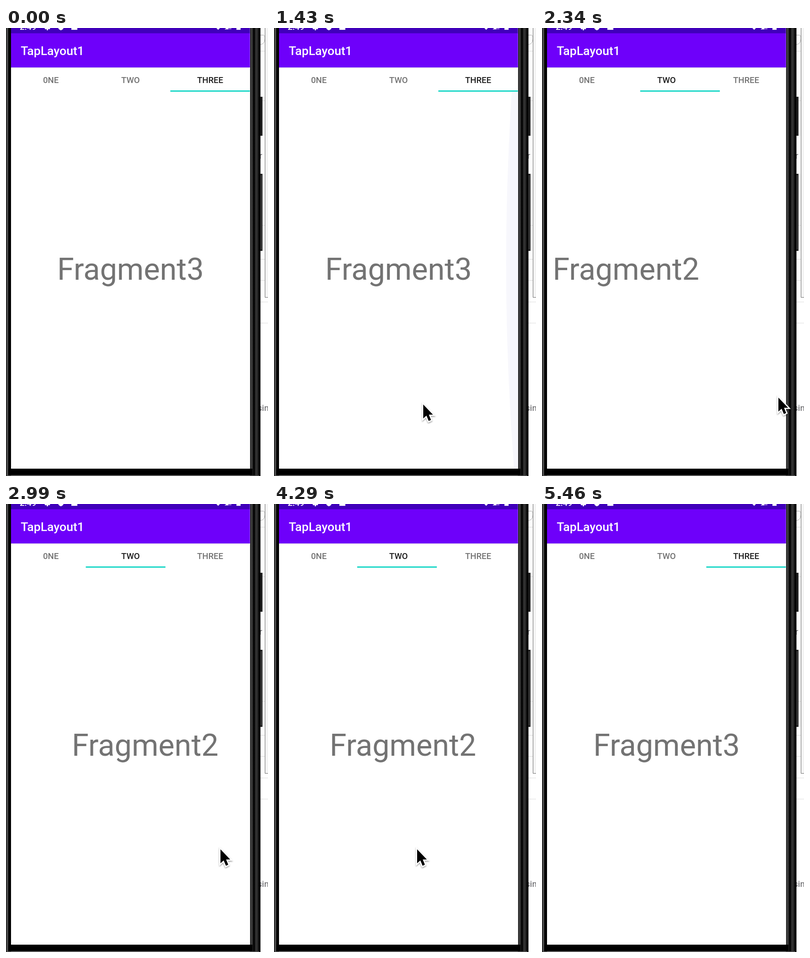
An HTML page for the animation above (5590 ms loop, 573 px wide and 977 px high).

```html
<!DOCTYPE html>
<html lang="en">
<head>
<meta charset="utf-8">
<title>Tab layout</title>
<style>
  html, body { margin: 0; width: 100%; height: 100%; overflow: hidden; background: #fff; }
  svg { display: block; width: 573px; height: 977px; font-family: Roboto, sans-serif; }
  .tab { font-size: 18.6px; font-weight: 500; text-anchor: middle; fill: #737373; }
  .tab.on { fill: #1d1d1d; }
  .page { font-size: 66.6px; text-anchor: middle; fill: #737373; }
  .side { font-size: 19px; fill: #5a5a5e; }
</style>
</head>
<body>
<svg viewBox="0 0 573 977">
  <defs>
    <linearGradient id="left">
      <stop offset="0" stop-color="#161616"/><stop offset=".3" stop-color="#606060"/>
      <stop offset=".5" stop-color="#080808"/><stop offset="1" stop-color="#000"/>
    </linearGradient>
    <linearGradient id="right">
      <stop offset="0" stop-color="#0a0a0a"/><stop offset=".17" stop-color="#4a4a4a"/>
      <stop offset=".32" stop-color="#050505"/><stop offset=".45" stop-color="#080808"/>
      <stop offset=".55" stop-color="#363636"/><stop offset=".72" stop-color="#2a2a2a"/>
      <stop offset=".85" stop-color="#050505"/><stop offset="1" stop-color="#000"/>
    </linearGradient>
    <linearGradient id="shade" x2="0" y2="1">
      <stop offset="0" stop-color="#e6e6ea"/><stop offset="1" stop-color="#fff"/>
    </linearGradient>
    <clipPath id="screen"><rect x="11" width="522.6" height="961"/></clipPath>
    <filter id="drop" x="-40%" y="-30%" width="190%" height="170%">
      <feDropShadow dx="0" dy="2" stdDeviation="1.8" flood-opacity=".4"/>
    </filter>
  </defs>

  <rect width="573" height="977" fill="#fff"/>
  <path d="M556 50.5h10M556 158.5h10M556 430.5h10M556 504.5h10M556 550.5h10M556 597.5h17M556 643.5h17" stroke="#dcdcdc"/>
  <path d="M554 15.5h8q4 0 4 5v3q0 12-11 13" fill="none" stroke="#aaa"/>
  <rect x="567" width="6" height="587" fill="#f3f3f3"/>
  <path d="M566.5 0V587.5H573" fill="none" stroke="#6c6c6c"/>
  <text class="side" x="554" y="285">r</text>
  <text class="side" x="550" y="835">sin</text>

  <path d="M553 150h8v85h-8zM553 318h8v168h-8z" fill="#222"/>
  <path d="M558 321V483" stroke="#777"/>
  <rect width="11" height="977" fill="url(#left)"/>
  <rect x="533.6" width="22.9" height="977" fill="url(#right)"/>
  <rect x="5" y="961" width="534" height="14.5" fill="#000"/>
  <rect x="3" y="975.5" width="551" height="1.5" fill="#555"/>

  <g clip-path="url(#screen)">
    <rect x="11" width="523" height="961" fill="#fff"/>
    <g id="pages"></g>
    <path id="glow" fill="#f7f7fc"/>
    <rect x="11" y="86" width="523" height="3" fill="url(#shade)"/>
    <rect x="11" y="11" width="523" height="75" fill="#6e00fa"/>
    <rect x="11" width="523" height="11.5" fill="#4000ba"/>
    <g fill="#fff">
      <text x="30" y="3.5" font-size="18.6" font-weight="500">2:49</text>
      <path d="M84 0h13l-2 3-3-1v3h-3V2l-3 1zM114 0h12q-2 4-6 5-4-1-6-5zM143 0h13v4h-13zM460 0h8l-4 4zM478 3l4-3h4v3zM504 0h9v4h-9z"/>
      <path d="M486 0h7v3h-7z" opacity=".4"/>
      <text x="32.3" y="59" font-size="26.6" font-weight="500">TapLayout1</text>
    </g>
    <g id="tabs"></g>
    <rect id="bar" y="136" width="174.2" height="3" fill="#1fd8c8"/>
  </g>

  <g id="cursor" filter="url(#drop)">
    <path d="M0 0V30.5L7 24.2L12 36L17 33.6L12.3 22.2H21.3Z"
      fill="#000" stroke="#fff" stroke-width="5" paint-order="stroke"/>
  </g>
</svg>
<script>
  const LOOP = 5590, STEP = 130, ENTER = 260, LEAVE = 5460, SETTLE = 70;
  const LEFT = 11, WIDTH = 522.6, TAB = WIDTH / 3;
  const $ = id => document.getElementById(id);

  // Each swipe drags the pager from a to b, then lets it settle on page `to`.
  const swipes = [
    { press: 1175, release: 1860, a: [437, 822], b: [83, 819], from: 2, to: 2 },
    { press: 1950, release: 2340, a: [83, 819], b: [517, 806], from: 2, to: 1 },
    { press: 2860, release: 3160, a: [437, 753], b: [517, 753], from: 1, to: 0 },
    { press: 3770, release: 4030, a: [438, 753], b: [313, 753], from: 0, to: 1 },
    { press: 4680, release: 4940, a: [438, 753], b: [300, 765], from: 1, to: 2 }
  ];
  const entry = { release: ENTER, b: [300, 950] };
  const exit = { press: 5330, a: [150, 945] };

  const clamp = p => Math.min(1, Math.max(0, p));
  const smooth = p => p * p * (3 - 2 * p);
  const mix = (a, b, p) => a.map((v, i) => v + (b[i] - v) * p);

  function cursorAt(t) {
    const drag = swipes.find(s => t >= s.press && t < s.release);
    if (drag) {
      const p = (t - drag.press) / (drag.release - drag.press);
      return mix(drag.a, drag.b, smooth(p));
    }
    // Between drags: rest for half the gap, then travel to the next press.
    const next = swipes.find(s => s.press > t) || exit;
    const last = swipes.findLast(s => s.release <= t) || entry;
    const p = clamp((t - last.release) / (next.press - last.release) * 2 - 1);
    return mix(last.b, next.a, smooth(p));
  }

  function pagerAt(t) {
    const s = swipes.findLast(s => s.press <= t);
    if (!s) return { page: 2, glow: 0 };
    const x = t < s.release ? cursorAt(t)[0] : s.b[0];
    const dragged = s.from - (x - s.a[0]) / WIDTH;
    const left = Math.exp(-Math.max(0, t - s.release) / SETTLE);
    const page = s.to + (Math.min(2, dragged) - s.to) * left;
    const glow = clamp((dragged - 2) * 5) * left;
    return { page, glow };
  }

  function addText(parent, cls, x, y, label) {
    const el = document.createElementNS("http://www.w3.org/2000/svg", "text");
    el.setAttribute("class", cls);
    el.setAttribute("x", x);
    el.setAttribute("y", y);
    el.textContent = label;
    return $(parent).appendChild(el);
  }

  const tabs = ["0NE", "TWO", "THREE"].map((label, i) => {
    addText("pages", "page", LEFT + WIDTH * (i + .5), 549.4, "Fragment" + (i + 1));
    return addText("tabs", "tab", LEFT + TAB * (i + .5), 120, label);
  });

  function draw(time) {
    const t = Math.floor((time % LOOP) / STEP) * STEP;
    const { page, glow } = pagerAt(t);
    const [x, y] = cursorAt(t);

    $("pages").setAttribute("transform", `translate(${-page * WIDTH} 0)`);
    $("bar").setAttribute("x", LEFT + page * TAB);
    tabs.forEach((tab, i) => tab.classList.toggle("on", i === Math.round(page)));
    $("glow").setAttribute("d",
      `M534 139H${534 - 14 * glow}Q${534 - 41 * glow} 550 ${534 - 9 * glow} 961H534Z`);
    $("cursor").setAttribute("transform", `translate(${x} ${y})`);
    $("cursor").style.display = t >= ENTER && t < LEAVE ? "" : "none";
  }

  const start = performance.now();
  function tick() {
    draw(performance.now() - start);
    requestAnimationFrame(tick);
  }
  tick();
</script>
</body>
</html>
```
